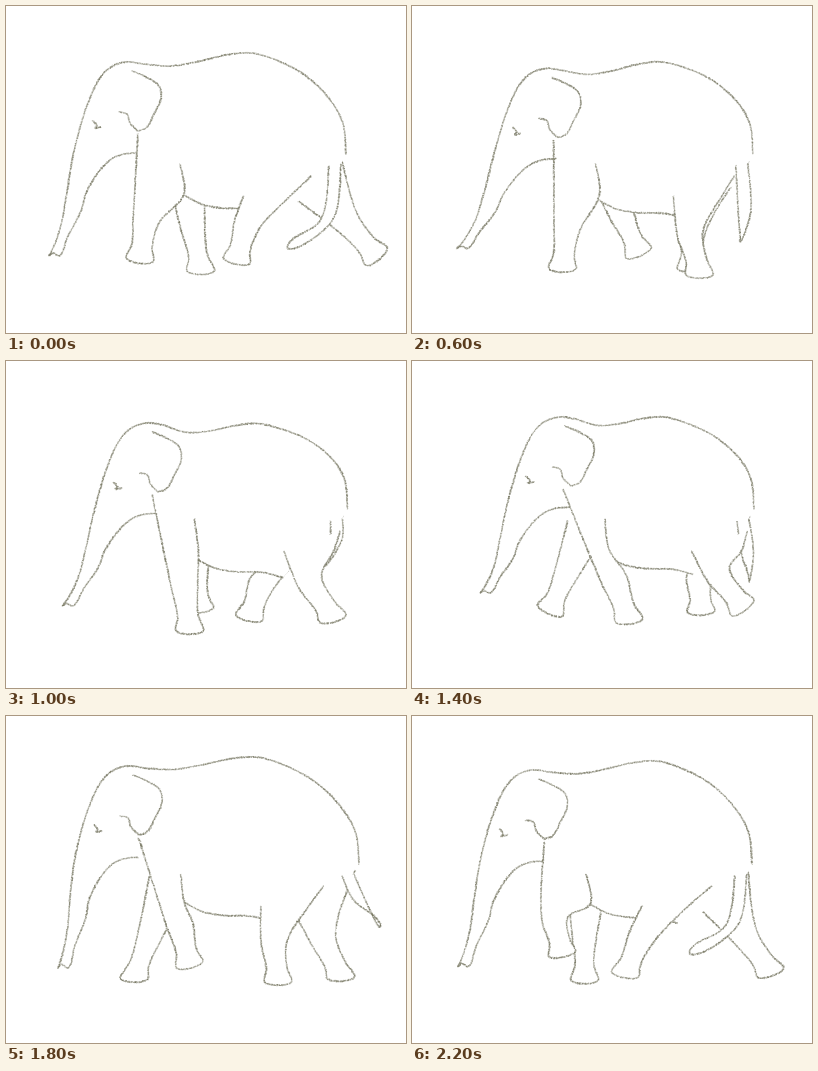
Recreate the animation shown at these times as an HTML page with a canvas. Size 400x327 px, loop 2.4 s.

```html
<!DOCTYPE html>
<html lang="en">
<head>
<meta charset="utf-8">
<title>Walking elephant</title>
<style>
html, body { margin: 0; width: 100%; height: 100%; overflow: hidden; background: #fff; }
canvas { display: block; width: 400px; height: 327px; }
</style>
</head>
<body>
<canvas id="stage" width="400" height="327"></canvas>
<script>
const ctx = document.getElementById('stage').getContext('2d');
const stepTime = 200, stepCount = 12;

const parse = text => text.split(' ').map(p => p.split(/[,:]/).map(Number));
const clamp = v => Math.min(Math.max(v, 0), 1);
const mix = (a, b, t) => a + (b - a) * t;
const mixPoint = (p, q, t) => [mix(p[0], q[0], t), mix(p[1], q[1], t)];
const along = (p, dir, d) => [p[0] + dir[0] * d, p[1] + dir[1] * d];

function unit(a, b) {
  const x = b[0] - a[0], y = b[1] - a[1], len = Math.hypot(x, y) || 1;
  return [x / len, y / len];
}

// Looping motion through "step:value" keys.
function track(text) {
  const keys = parse(text), first = keys[0], last = keys[keys.length - 1];
  const loop = [[last[0] - stepCount, last[1]], ...keys, [first[0] + stepCount, first[1]]];
  return step => {
    const i = loop.findIndex(k => k[0] > step);
    const [t0, a] = loop[i - 1], [t1, b] = loop[i];
    return mix(a, b, (step - t0) / (t1 - t0));
  };
}

const path = (x, y) => {
  const tx = track(x), ty = track(y);
  return step => [tx(step), ty(step)];
};

// Body motion, as offsets from the rest pose.
const headMove = path('0:0 1:7 7:27 9:1', '0:0 1:7 5:6 9:-6');
const tipMove = path('0:0 3:2 7:25 9:9', '0:0 1:-10 5:-5 7:-18 9:2');
const backLift = track('0:0 3:10 5:19 7:12 8:-9 9:-6');
const rumpMove = track('0:0 7:2 9:13 11:0');

const tailTip = path('1:286 3:328 5:318 7:337 8:394 9:374 11:278', '1:247 3:236 5:205 7:221 8:198 11:238');
const feet = {
  frontNear: path('1:117 7:217', '0:254 1:256 5:270 7:260 11:238'),
  frontFar: path('1:217 3:227 5:194 7:138 9:128', '1:266 3:247 7:250 9:263'),
  hindNear: path('1:248 5:327 7:331 11:213', '0:255 1:268 3:269 7:247 9:266'),
  hindFar: path('0:371 3:279 5:243 9:335', '1:245 3:263 7:251 9:262 11:257')
};

// Rest pose.
const rest = {
  face: parse('43,250 48,240 56,215 61,185 67,150 75,118 82,97 94,72 105,61 120,56 137,58'),
  trunk: parse('43,250 47,247 53,250 62,230 75,205 81,185 104,154 118,148 131,147'),
  ear: parse('126,65 140,71 153,80 155,92 148,108 140,122 132,125'),
  lobe: parse('113,106 121,108 124,117 132,125'),
  eye: parse('87,115 91,120 89,122 95,121'),
  back: parse('137,58 165,60 190,56 220,49 245,47 270,54 300,70 325,95 337,118 340,148'),
  belly: parse('178,189 195,198 215,202 245,203 265,208')
};

function random(seed) {
  return () => {
    seed = (seed + 0x6D2B79F5) | 0;
    let t = Math.imul(seed ^ (seed >>> 15), 1 | seed);
    t = (t + Math.imul(t ^ (t >>> 7), 61 | t)) ^ t;
    return ((t ^ (t >>> 14)) >>> 0) / 4294967296;
  };
}

// Soft curve through the points; the tangent shrinks at sharp corners.
function curve(pts, detail = 14) {
  const end = pts.length - 1;
  const tangent = i => mixPoint(
    unit(pts[Math.max(i - 1, 0)], pts[i]),
    unit(pts[i], pts[Math.min(i + 1, end)]), 0.5);
  const line = [pts[0]];
  for (let i = 0; i < end; i++) {
    const p = pts[i], q = pts[i + 1], m = tangent(i), n = tangent(i + 1);
    const len = Math.hypot(q[0] - p[0], q[1] - p[1]);
    for (let k = 1; k <= detail; k++) {
      const t = k / detail, s = 1 - t;
      line.push([0, 1].map(c =>
        p[c] * s * s * (1 + 2 * t) + q[c] * t * t * (3 - 2 * t) +
        len * (m[c] * t * s * s - n[c] * t * t * s)));
    }
  }
  return line;
}

function cover(line) {
  ctx.globalAlpha = 1;
  ctx.fillStyle = '#fff';
  ctx.beginPath();
  line.forEach(p => ctx.lineTo(...p));
  ctx.fill();
}

// Pencil line made of fine grains, with slowly changing pressure.
function pencil(line, rnd, firm = 0.3) {
  const phase = rnd() * 6.28;
  let walked = 0;
  ctx.fillStyle = '#74745f';
  for (let i = 1; i < line.length; i++) {
    const p = line[i - 1], q = line[i];
    const len = Math.hypot(q[0] - p[0], q[1] - p[1]);
    const grains = Math.floor(len / 0.25 + rnd());
    for (let g = 0; g < grains; g++) {
      const t = rnd(), d = walked + t * len;
      const press = Math.max(firm, 0.62 + 0.26 * Math.sin(d / 17 + phase) + 0.14 * Math.sin(d / 4.3 + phase * 3));
      const spread = 0.9 + press * 0.7;
      const [x, y] = mixPoint(p, q, t);
      ctx.globalAlpha = (0.2 + rnd() * 0.4) * (0.4 + press * 0.7);
      ctx.fillRect(x + (rnd() - 0.5) * spread - 0.5, y + (rnd() - 0.5) * spread - 0.5, 1, 1);
    }
    walked += len;
  }
}

// Outline from the front of the thigh, round the foot, up the back.
function leg({ hip, foot, bend = 0, width = 13, front, back }) {
  const knee = along(mixPoint(hip, foot, 0.66), [-1, 0], bend);
  const ankle = mixPoint(knee, foot, 0.65);
  const shin = unit(knee, foot);
  const across = [shin[1], -shin[0]];
  // A planted sole lies flat; a lifted one is square to the shin.
  const sole = unit([0, 0], mixPoint([1, 0], across, clamp((264 - foot[1]) / 12)));
  return curve([
    ...front, along(knee, across, -width), along(ankle, across, -width * 0.8),
    along(foot, sole, -13.5), along(foot, sole, 13.5),
    along(ankle, across, width * 0.8), along(knee, across, width), ...back]);
}

function draw(step) {
  const rnd = random(step * 977 + 5);
  const head = headMove(step), tip = tipMove(step);
  const lift = backLift(step), rump = rumpMove(step);
  const foot = Object.fromEntries(Object.entries(feet).map(([name, at]) => [name, at(step)]));
  const solid = line => { cover(line); pencil(line, rnd); };

  const bodyShift = ([x, y]) => {
    const u = clamp((x - 137) / 200), v = 1 - u;
    return [x + head[0] * v * v + rump * u, y + head[1] * v * v + lift * 3 * u * v];
  };
  const headShift = ([x, y]) => {
    const t = clamp((y - 118) / 132) ** 2;
    return [x + mix(head[0], tip[0], t), y + mix(head[1], tip[1], t)];
  };

  ctx.globalAlpha = 1;
  ctx.clearRect(0, 0, 400, 327);

  const farHip = [172 + head[0] * 0.5, 140];
  const farReach = (foot.frontFar[0] - farHip[0]) * 0.25;
  solid(leg({
    hip: farHip, foot: foot.frontFar, width: 12,
    front: [[farHip[0] - 18 + farReach, 160]], back: [[farHip[0] + 22 + farReach, 170]]
  }));
  solid(leg({
    hip: [305, 150], foot: foot.hindFar, bend: 7,
    front: [[285, 190]], back: [[336 + rump, 155]]
  }));

  const back = curve(rest.back.map(bodyShift));
  const belly = curve(rest.belly.map(([x, y]) => [x + head[0] * 0.6, y + lift * 0.45]));
  cover([...back, [325, 178], [297, 193], ...belly.slice().reverse()]);
  pencil(back, rnd);
  pencil(belly, rnd);

  const end = tailTip(step), root = 333 + rump;
  const sway = [mix(root, end[0], 0.25), end[1] - 28];
  solid(curve([
    [root - 10, 160], [sway[0] - 6, sway[1]], along(end, [0, 1], -4),
    end, [sway[0] + 6, sway[1]], [root + 2, 158]]));

  const reach = foot.hindNear[0] - 270;
  solid(leg({
    hip: [290, 150], foot: foot.hindNear, bend: 10,
    front: [[254 + reach * 0.42, 190]],
    back: [[302 + reach * 0.45, 190], [317 + reach * 0.3, 170]]
  }));

  const chest = head[0] * 0.7, shoulder = [155 + chest, 140 + head[1]];
  const span = Math.hypot(foot.frontNear[0] - shoulder[0], foot.frontNear[1] - shoulder[1]);
  solid(leg({
    hip: shoulder, foot: foot.frontNear, bend: Math.max(0, 118 - span) * 0.5,
    front: [[132 + chest, 128 + head[1]]],
    back: [[178 + chest, 188], [174 + chest, 158]]
  }));

  for (const name of ['face', 'trunk', 'ear', 'lobe', 'eye']) {
    pencil(curve(rest[name].map(headShift)), rnd, name === 'eye' ? 0.9 : 0.3);
  }
}

const start = performance.now();
let shown = -1;
function tick() {
  const step = Math.floor((performance.now() - start) / stepTime) % stepCount;
  if (step !== shown) draw(shown = step);
  requestAnimationFrame(tick);
}
tick();
</script>
</body>
</html>
```
